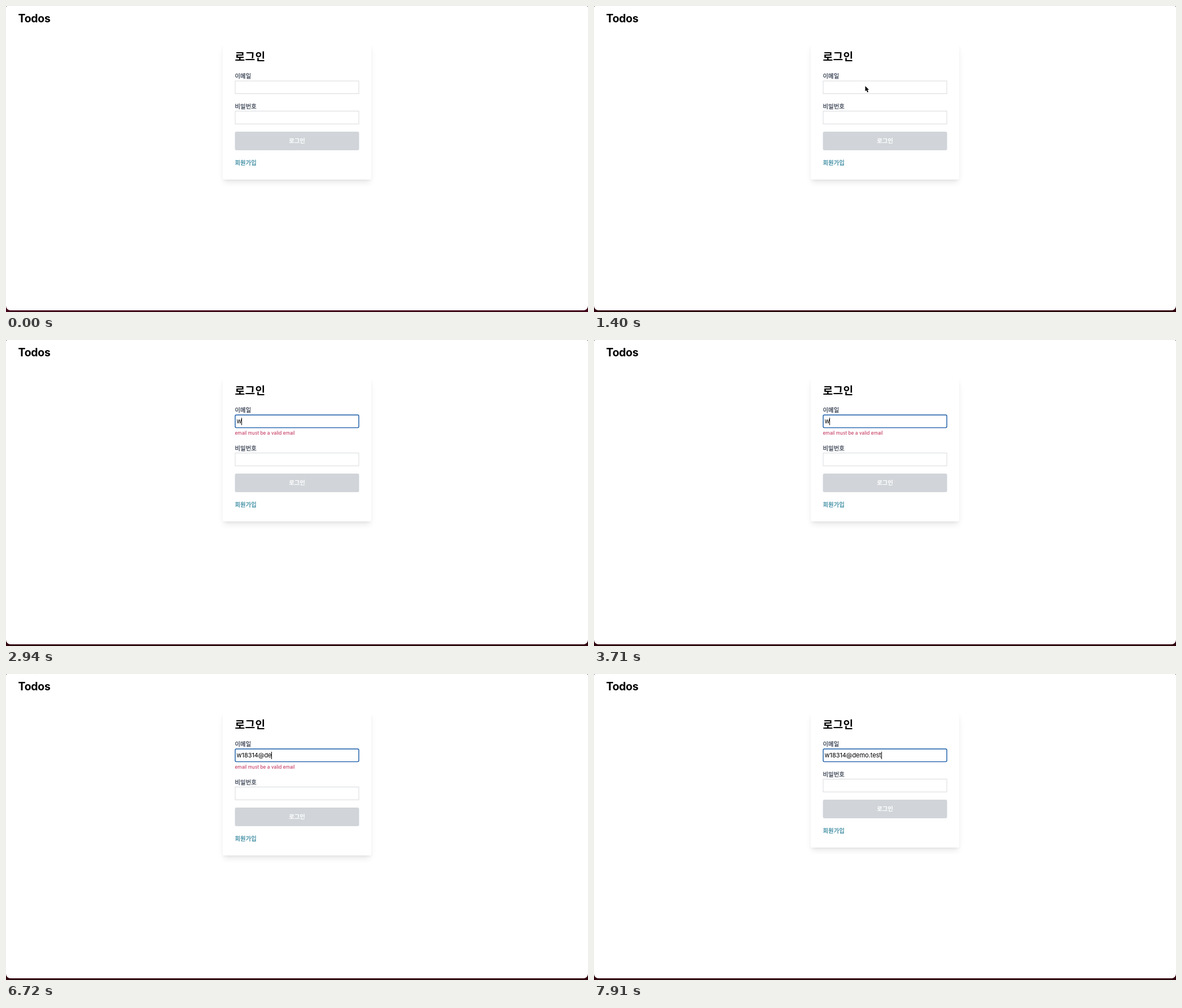
Write an HTML page that moves like this. It is 1031 px wide and 543 px high and loops after 8 s.

```html
<!DOCTYPE html>
<html lang="ko">
<head>
<meta charset="utf-8">
<title>Todos</title>
<style>
  html, body { margin: 0; width: 100%; height: 100%; overflow: hidden; background: #30040f; }
  #stage {
    position: relative; width: 1031px; height: 543px; overflow: hidden;
    background: #30040f; font-family: Inter, "Liberation Sans", sans-serif;
  }
  #stage div, #stage svg, #caret { position: absolute; white-space: pre; }
  #window { inset: 0 0 3px; background: #fff; border-radius: 2px 2px 8px 8px; }
  .ko { font-family: "Noto Sans CJK KR", "Noto Sans CJK", "Noto Sans KR", sans-serif; }
  .logo {
    left: 21.5px; top: 7px; line-height: 30px; font-size: 19.5px;
    font-weight: 700; letter-spacing: -.3px; color: #000;
  }
  #card {
    left: 384px; top: 66px; width: 263px; height: 242px; background: #fff; border-radius: 2px;
    box-shadow: 0 6.9px 10.3px -2px rgba(0,0,0,.1), 0 2.75px 4.1px -1.4px rgba(0,0,0,.05);
  }
  .title {
    left: 405.5px; top: 74px; line-height: 30px; font-size: 19.2px;
    font-weight: 700; letter-spacing: .4px; color: #000;
  }
  .label {
    left: 405.5px; line-height: 16px; font-size: 10.3px; letter-spacing: .1px;
    font-weight: 500; color: #2d3748; -webkit-text-stroke: .25px currentColor;
  }
  .link { color: #2a8199; }
  .caption {
    left: 405.5px; top: 223px; width: 220px; line-height: 32.5px; text-align: center;
    font-size: 10.4px; font-weight: 700; color: #fff;
  }
  .boxes { left: 0; top: 0; width: 1031px; height: 543px; }
  .field { fill: #fff; stroke: #cfd1d5; stroke-width: .8; }
  #typed {
    left: 408.5px; top: 136px; height: 17px; line-height: 17px;
    font-size: 11px; letter-spacing: -.05px; color: #000;
  }
  #caret { left: 100%; top: 2px; width: 1px; height: 13px; background: #000; }
  #error {
    left: 405.5px; top: 158.5px; line-height: 12px; font-size: 8.25px;
    letter-spacing: .05px; color: #bd2450; visibility: hidden;
  }
  #lower { left: 0; top: 0; }
  .focused #email { stroke: #1659a5; stroke-width: 1.4; rx: 2px; }
  .invalid #error { visibility: visible; }
  .invalid #lower { transform: translateY(14px); }
  .invalid #card { height: 256px; }
  #pointer { left: 0; top: 0; width: 10px; height: 15px; overflow: visible; }
</style>
</head>
<body>
<div id="stage">
  <div id="window"></div>
  <div class="logo">Todos</div>
  <div id="card"></div>
  <div class="ko title">로그인</div>
  <div class="ko label" style="top:116px">이메일</div>
  <svg class="boxes"><rect id="email" class="field" x="406" y="133" width="219" height="22.6"/></svg>
  <div id="typed"><span id="text"></span><i id="caret"></i></div>
  <div id="error">email must be a valid email</div>
  <div id="lower">
    <svg class="boxes">
      <rect class="field" x="406" y="186.6" width="219" height="22.6"/>
      <rect x="405.5" y="223" width="220" height="33" rx="2.75" fill="#d1d5d9"/>
    </svg>
    <div class="ko label" style="top:169.5px">비밀번호</div>
    <div class="ko caption">로그인</div>
    <div class="ko label link" style="top:270px">회원가입</div>
  </div>
  <svg id="pointer" viewBox="0 0 10 15">
    <path d="M0 0V9.3L2.1 7.4L3.8 11.2L5.5 10.4L3.8 6.8H6.6Z" fill="#000" stroke="#fff" stroke-width=".8" paint-order="stroke"/>
  </svg>
</div>
<script>
  const LOOP = 8000, TICK = 70;
  const ADDRESS = "w18314@demo.test";
  const $ = id => document.getElementById(id);
  const stage = $("stage"), text = $("text"), caret = $("caret"), pointer = $("pointer");

  // [time, typed length, caret visible]
  const typing = [
    [0, 0, 0], [1820, 0, 1], [2310, 0, 0], [2590, 1, 1], [3150, 0, 1], [3710, 1, 1],
    [4200, 1, 0], [4480, 2, 1], [4620, 3, 1], [4760, 4, 1], [4830, 5, 1], [4970, 6, 1],
    [5460, 7, 1], [5950, 7, 0], [6230, 8, 1], [6720, 9, 1], [6930, 10, 1], [7280, 11, 1],
    [7560, 12, 1], [7700, 13, 1], [7770, 14, 1], [7910, 16, 1]
  ];

  const ramp = (t, from, to) => Math.min(1, Math.max(0, (t - from) / (to - from)));
  const bend = (a, b, c, p) => (1 - p) * (1 - p) * a + 2 * p * (1 - p) * b + p * p * c;

  function pointerAt(t) {
    const rise = 1 - (1 - ramp(t, 0, 910)) ** 2;
    const settle = ramp(t, 1050, 1400);
    return [bend(500, 400, 478, rise) + 2.5 * settle, bend(545, 270, 145, rise) - 3 * settle];
  }

  function draw(t) {
    const [, length, caretOn] = typing.findLast(step => step[0] <= t);
    text.textContent = ADDRESS.slice(0, length);
    caret.style.visibility = caretOn ? "visible" : "hidden";
    stage.classList.toggle("focused", t >= 1820);
    stage.classList.toggle("invalid", t >= 2590 && t < 7700);

    const [x, y] = pointerAt(Math.floor(t / TICK) * TICK);
    pointer.style.transform = `translate(${x}px, ${y}px)`;
    pointer.style.visibility = t >= TICK && t < 1820 ? "visible" : "hidden";
    stage.style.backgroundColor = t < 910 ? "#43051c" : "#30040f";
  }

  const start = performance.now();
  function loop() {
    draw((performance.now() - start) % LOOP);
    requestAnimationFrame(loop);
  }
  draw(0);
  requestAnimationFrame(loop);
</script>
</body>
</html>
```
